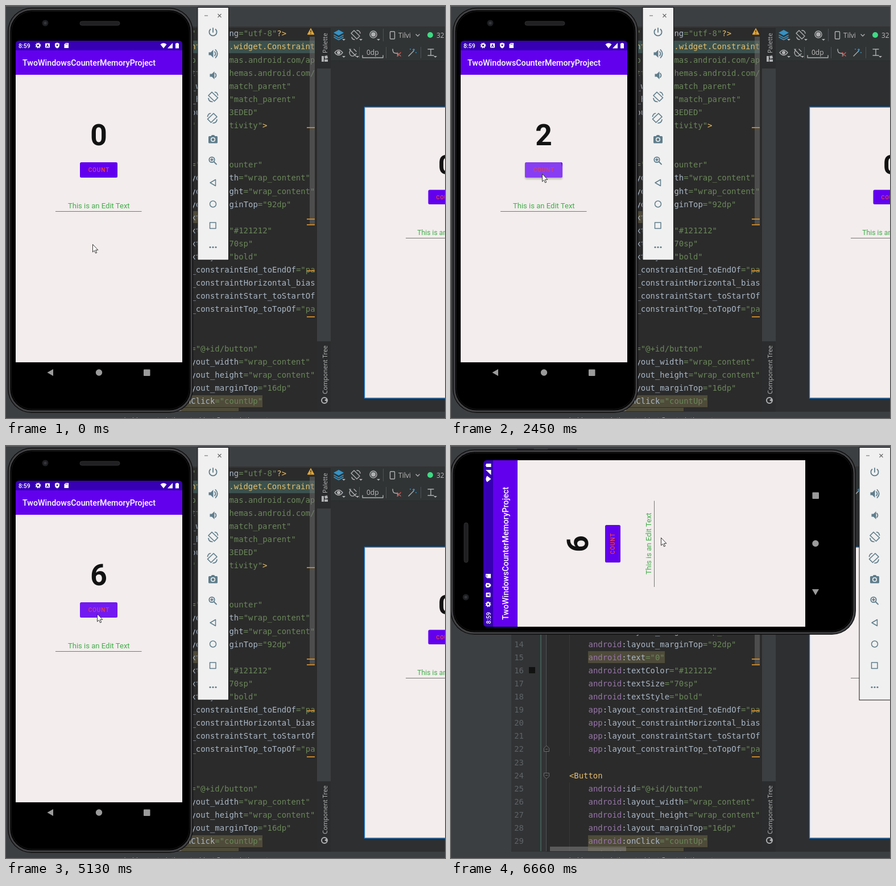
Recreate the animation shown at these times as an HTML page. Size 772 by 725 pixels, loop 8000 ms.

```html
<!DOCTYPE html>
<html lang="en">
<head>
<meta charset="utf-8">
<title>Counter app in an emulator</title>
<style>
html, body { margin: 0; width: 100%; height: 100%; overflow: hidden; background: #3c3f41; }
svg { display: block; width: 772px; height: 725px; }
text { white-space: pre; }
.code { font: 13.93px "DejaVu Sans Mono", "Noto Sans Mono", monospace; fill: #a9b7c6; }
.code .tag { fill: #e8bf6a; }
.code .ns { fill: #9876aa; }
.code .str { fill: #6a8759; }
.code .num { fill: #606366; text-anchor: end; }
.ui { font-family: "Open Sans", "Noto Sans", sans-serif; fill: #bbb; }
.app { font-family: Roboto, sans-serif; }
.mid { text-anchor: middle; }
.line { fill: none; stroke-linecap: round; stroke-linejoin: round; }
</style>
</head>
<body>
<svg viewBox="0 0 772 725" xmlns="http://www.w3.org/2000/svg">
  <defs>
    <clipPath id="editorClip"><rect x="106" y="38" width="437" height="675"/></clipPath>
    <clipPath id="surfaceClip"><rect x="631" y="179" width="141" height="511"/></clipPath>
    <clipPath id="buttonClip"><rect x="130" y="275" width="66" height="27" rx="2.5"/></clipPath>
    <clipPath id="wideClip"><rect x="1" y="2" width="712" height="334" rx="40"/></clipPath>
    <filter id="blur" x="-20%" y="-40%" width="140%" height="200%"><feGaussianBlur stdDeviation="1.6"/></filter>
  </defs>

  <!-- editor -->
  <rect width="772" height="725" fill="#3c3f41"/>
  <rect width="772" height="1" fill="#606164"/>
  <rect x="106" y="36" width="666" height="1.5" fill="#323232"/>
  <rect x="106" y="38" width="441" height="676" fill="#2b2b2b"/>
  <rect x="106" y="38" width="62" height="676" fill="#313335"/>
  <g clip-path="url(#editorClip)">
    <rect x="174" y="61" width="369" height="22" fill="#3b514d"/>
    <g fill="#4f4b3a">
      <rect x="241" y="361" width="135" height="21"/>
      <rect x="241" y="685" width="210" height="21"/>
      <rect x="241" y="707" width="168" height="21"/>
    </g>
    <path d="M208.5 268V545M208.5 592V714" stroke="#383838"/>
    <path d="M158 38V714" stroke="#47685c" stroke-width="1.5"/>
    <path d="M167.5 38V714" stroke="#505254"/>
    <g fill="#2b2b2b" stroke="#6a6d6f">
      <path d="M163.5 537.5v-6l4.5-4 4.5 4v6z"/>
      <path d="M163.5 575.5v6l4.5 4 4.5-4v-6z"/>
      <path d="M166 533.5h4M166 579.5h4"/>
    </g>
    <rect x="137" y="389" width="11" height="11" fill="#121212"/>
    <g id="code" class="code"></g>
    <rect x="174" y="705" width="134" height="8" fill="#8a8a8a" opacity=".5"/>
    <rect x="534" y="54" width="9" height="331" fill="#777" opacity=".45"/>
    <path d="M529 214H543M529 375H543M529 385H543M529 466H543M529 547H543" stroke="#c2842c" stroke-width="2"/>
    <path d="M536 39.5l5.8 10.5h-11.6z" fill="#e0a63a" stroke="#e0a63a" stroke-linejoin="round"/>
    <path d="M536 42.5v4M536 48v1.3" stroke="#3a3020" stroke-width="1.4"/>
  </g>
  <text class="ui" x="190" y="732" font-size="11.5">androidx.constraintlayout.widget.ConstraintLayout</text>

  <!-- design pane -->
  <rect x="543" y="38" width="4" height="676" fill="#2b2b2b"/>
  <rect x="547" y="38" width="24" height="72" fill="#2a2c2d"/>
  <rect x="547" y="590" width="24" height="124" fill="#2a2c2d"/>
  <g class="ui" font-size="11">
    <text transform="translate(565 83) rotate(-90)">Palette</text>
    <text transform="translate(565 683) rotate(-90)">Component Tree</text>
  </g>
  <path d="M555 88h4v10h-4zM560 94h6v4h-6zM560 88l5-1 1 5-5 1z" fill="#afb1b3"/>
  <circle cx="560" cy="694" r="5" fill="none" stroke="#afb1b3" stroke-width="2"/>
  <path d="M560 694l4-4v6z" fill="#afb1b3"/>
  <rect x="571" y="37" width="201" height="677" fill="#2d2f31"/>
  <rect x="571" y="37" width="201" height="59" fill="#313435"/>
  <path d="M571 96.5H772" stroke="#292b2c"/>
  <path d="M663.5 40V62M621.5 72V92M668.5 72V92M729.5 72V92" stroke="#505355"/>
  <path d="M585 42l9 5-9 5-9-5z" fill="#3592c4"/>
  <path class="line" d="M577 51.5l8 4.5 8-4.5M577 55l8 4.5 8-4.5" stroke="#3592c4" stroke-width="1.7"/>
  <g class="line" stroke="#afb1b3" stroke-width="1.4">
    <path d="M612 43l10 10-5 5-10-10zM608 55q1 4 5 4M623 48q-1-5-6-5"/>
    <circle cx="646" cy="50" r="6"/>
    <rect x="675.5" y="45" width="8" height="13" rx="1"/>
    <path d="M721 50l3 3 3-3"/>
    <path d="M578 82q7-9 14 0q-7 9-14 0z"/>
    <path d="M606 76l-2 6q1 7 7 6l5-4M604 76l11 12M612 76l4 4"/>
    <path d="M627 87v4h36v-4"/>
    <path d="M680 76q0 7 5 7t4 5"/>
    <path d="M708 88l9-9"/>
    <path d="M742 76h10M747 76v11M742 87h10"/>
  </g>
  <circle cx="646" cy="50" r="4" fill="#afb1b3"/>
  <circle cx="585" cy="82" r="3" fill="#afb1b3"/>
  <path class="line" d="M688 82l6 6m0-6l-6 6" stroke="#c75450" stroke-width="1.7"/>
  <path d="M717 75v4M715 77h4M711 75v2M720 82h2" stroke="#3592c4" stroke-width="1.5"/>
  <g fill="#afb1b3"><path id="drop" d="M591 58h6l-3 3z"/><use href="#drop" x="30"/><use href="#drop" x="61"/><use href="#drop" y="30"/><use href="#drop" x="24" y="30"/><use href="#drop" x="161" y="30"/></g>
  <circle cx="746" cy="51" r="5" fill="#3ddc84"/>
  <g class="ui" font-size="12">
    <text x="690" y="56">Tilvi</text>
    <text x="757" y="56">32</text>
    <text x="634" y="86">0dp</text>
  </g>
  <rect x="630.5" y="178" width="150" height="512" fill="#f3eded" stroke="#1c7cd5" stroke-width="1.4"/>
  <g class="app mid" clip-path="url(#surfaceClip)">
    <text x="774" y="295.5" font-size="49" font-weight="700" fill="#121212">0</text>
    <rect x="742.5" y="323.5" width="63" height="25.5" rx="2.5" fill="#6200ee"/>
    <text x="774" y="339.5" font-size="9.3" font-weight="500" letter-spacing=".85" fill="#f44336">COUNT</text>
    <text x="774" y="403" font-size="12.2" fill="#3fae49">This is an Edit Text</text>
    <path d="M703 408.5H845" stroke="#777"/>
  </g>

  <!-- phone -->
  <g id="clipBox"><g id="phone">
    <rect x="328" y="174" width="2.5" height="52" rx="1" fill="#29292b"/>
    <rect x="328" y="120" width="2.5" height="30" rx="1" fill="#29292b"/>
    <rect x="3" y="3" width="326" height="713" rx="42" fill="#0d0d0e"/>
    <rect x="6" y="6" width="320" height="707" rx="39" fill="#000" stroke="#424245" stroke-width="3"/>
    <rect x="9.5" y="9.5" width="313" height="700" rx="36" fill="#000" stroke="#19191a"/>
    <circle cx="69" cy="30" r="5.5" fill="#1e1f22"/>
    <circle cx="69" cy="30" r="2.5" fill="#34363c"/>
    <rect x="130" y="27" width="70" height="7" rx="3.5" fill="#202022" stroke="#303033"/>
    <rect x="17" y="120" width="293" height="507" fill="#f3eded"/>
    <path d="M17 79V67q0-6 6-6H304q6 0 6 6V79z" fill="#3700b3"/>
    <rect x="17" y="78" width="293" height="43" fill="#6200ee"/>
    <g class="app">
      <text x="22" y="73.5" font-size="10.5" font-weight="500" fill="#fff">8:59</text>
      <text x="29" y="105" font-size="14.26" font-weight="500" fill="#fff">TwoWindowsCounterMemoryProject</text>
    </g>
    <circle cx="56.5" cy="69.5" r="2.7" fill="none" stroke="#fff" stroke-width="2"/>
    <circle cx="56.5" cy="69.5" r="4.2" fill="none" stroke="#fff" stroke-width="1.5" stroke-dasharray="1.65"/>
    <g fill="#fff">
      <rect x="69" y="65.5" width="8" height="8" rx="1"/>
      <path d="M90 64.5l4 1.5v3q0 4-4 5.5q-4-1.5-4-5.5v-3z"/>
      <path d="M105 65h5v9h-7.5v-6.5z"/>
      <path d="M277 74.5l-5.5-7q5.5-4.5 11 0z"/>
      <path d="M293 65v9.5h-9z"/>
      <path d="M299.5 65h3v1h1.5v8.5h-6v-8.5h1.5z"/>
    </g>
    <path class="line" d="M71.2 72l1.8-4.7 1.8 4.7M72 70.6h2" stroke="#3700b3"/>
    <circle cx="90" cy="69" r="1.5" fill="#3700b3"/>
    <path d="M105.5 66v2M107.5 66v2" stroke="#3700b3" stroke-width=".8"/>
    <g class="app mid">
      <text id="count" x="163" y="244.6" font-size="51.5" font-weight="700" fill="#121212">0</text>
      <rect id="shade" x="130" y="277" width="66" height="28" rx="3" fill="#000" filter="url(#blur)"/>
      <rect x="130" y="275" width="66" height="27" rx="2.5" fill="#6200ee"/>
      <circle id="ripple" cx="158" cy="292" r="0" fill="#fff" clip-path="url(#buttonClip)"/>
      <text id="label" x="163.4" y="292.3" font-size="10" font-weight="500" letter-spacing=".9" fill="#f44336">COUNT</text>
      <text x="163.3" y="356.3" font-size="13.05" fill="#3fae49">This is an Edit Text</text>
    </g>
    <path d="M87 361.5H238.5" stroke="#777"/>
    <g fill="#9b9b9b">
      <path d="M72.5 645l10.5-6v12z"/>
      <circle cx="163.5" cy="645" r="5.7"/>
      <rect x="242" y="639.5" width="11.5" height="11.5" rx="1"/>
    </g>
  </g></g>

  <!-- emulator controls -->
  <g id="panel">
    <rect x="337" y="2.5" width="54.5" height="444.5" fill="#f0f0f0" stroke="#151515"/>
    <path d="M349 17h6M372.5 14l6 6m0-6l-6 6" stroke="#666" stroke-width="1.1"/>
    <g class="line" stroke="#5f7d8b" stroke-width="1.8">
      <path d="M364 39v7M359.5 41a6.6 6.6 0 1 0 9 0"/>
      <path d="M367 80.5q3 3.5 0 7M368.5 77q6.5 7 0 14"/>
      <path d="M368 118.5q3 3.5 0 7"/>
      <path id="turn" stroke-width="1.7" d="M362 151.5l10.5 10-6 6-10.5-10zM356 162.5q1 6 7 6M372.5 157q-1-5-5-5.5"/>
      <use href="#turn" transform="translate(727 37.5) scale(-1 1)"/>
      <circle cx="362" cy="270.5" r="4.7"/>
      <path d="M365.5 274l4.5 4.5M360 270.5h4M362 268.5v4"/>
      <path d="M359 311l9.5-5.5v11z" stroke-width="1.5"/>
      <circle cx="364" cy="348.5" r="5.5" stroke-width="1.5"/>
      <rect x="358.5" y="381" width="10.5" height="10.5" stroke-width="1.5"/>
    </g>
    <g fill="#5f7d8b">
      <path id="horn" d="M356.5 81.5h3.5l4.5-4.5v14l-4.5-4.5h-3.5z"/>
      <use href="#horn" x="2" y="38"/>
      <path d="M357.5 229h3l1.5-2h4l1.5 2h3q1.5 0 1.5 1.5v9.5q0 1.5-1.5 1.5h-13q-1.5 0-1.5-1.5v-9.5q0-1.5 1.5-1.5z"/>
      <circle cx="359" cy="424.5" r="1.6"/><circle cx="364" cy="424.5" r="1.6"/><circle cx="369" cy="424.5" r="1.6"/>
    </g>
    <circle cx="364" cy="235" r="3.3" fill="none" stroke="#f0f0f0" stroke-width="1.6"/>
  </g>

  <path id="cursor" d="M.5.5V14L3.5 11.2 5.6 16 7.7 15.1 5.6 10.4H9.8Z" fill="#fff" stroke="#222" stroke-width=".9"/>
</svg>
<script>
const $ = id => document.getElementById(id);
const LOOP = 8000;

const attr = (name, value) => `        ${name}="${value}"`;
const LINES = [
  '<?xml version="1.0" encoding="utf-8"?>',
  '<androidx.constraintlayout.widget.ConstraintLayout',
  '    xmlns:app="http://schemas.android.com/apk/res-auto"',
  '    xmlns:tools="http://schemas.android.com/tools"',
  '    android:layout_width="match_parent"',
  '    android:layout_height="match_parent"',
  '    android:background="#F3EDED"',
  '    tools:context=".MainActivity">',
  '',
  '    <TextView',
  attr('android:id', '@+id/counter'),
  attr('android:layout_width', 'wrap_content'),
  attr('android:layout_height', 'wrap_content'),
  attr('android:layout_marginTop', '92dp'),
  attr('android:text', '0'),
  attr('android:textColor', '#121212'),
  attr('android:textSize', '70sp'),
  attr('android:textStyle', 'bold'),
  attr('app:layout_constraintEnd_toEndOf', 'parent'),
  attr('app:layout_constraintHorizontal_bias', '0.498'),
  attr('app:layout_constraintStart_toStartOf', 'parent'),
  attr('app:layout_constraintTop_toTopOf', 'parent') + ' />',
  '',
  '    <Button',
  attr('android:id', '@+id/button'),
  attr('android:layout_width', 'wrap_content'),
  attr('android:layout_height', 'wrap_content'),
  attr('android:layout_marginTop', '16dp'),
  attr('android:onClick', 'countUp'),
  attr('android:text', 'Count')
];

const SVG = 'http://www.w3.org/2000/svg';
function add(parent, tag, cls, text, attrs = {}) {
  const el = document.createElementNS(SVG, tag);
  if (cls) el.setAttribute('class', cls);
  for (const key in attrs) el.setAttribute(key, attrs[key]);
  el.textContent = text;
  return parent.appendChild(el);
}

const TOKEN = /(<\??[\w.]+|\??\/?>)|(\w+)(?=:)|(="[^"]*")|[^<>"=?\/]/g;
LINES.forEach((line, i) => {
  const y = 53.3 + i * 23.1;
  add($('code'), 'text', 'num', i + 1, { x: 128, y });
  const body = line.trimStart();
  const x = 174.4 + (line.length - body.length) * 8.388;
  const row = add($('code'), 'text', '', '', { x, y });
  for (const [all, tag, ns, str] of body.matchAll(TOKEN)) {
    add(row, 'tspan', tag ? 'tag' : ns ? 'ns' : str ? 'str' : '', all);
  }
});

// Each row: start time, then values held until the next row.
const CURSOR = [
  [0, 152, 419], [150, 145, 351], [340, 154, 318], [480, 158, 308], [630, 159, 300],
  [750, 160, 295], [5280, 225, 223], [5430, 290, 178], [5550, 365, 148],
  [5670, 364, 154], [5820, 369, 161]
];
const COUNT = [[0, 0], [1750, 1], [2450, 2], [3160, 3], [3670, 4], [4400, 5], [4980, 6]];
// radius, opacity, shadow
const PRESS = [39, .24, .2];
const EARLY = [36, .24, .35];
const FADE = [60, .1, 0];
const REST = [0, 0, 0];
const RIPPLE = [
  [0, ...REST], [1750, ...PRESS], [1900, ...FADE], [2050, ...REST],
  [2450, ...PRESS], [2720, ...REST], [3010, ...EARLY], [3160, ...FADE],
  [3280, ...REST], [3670, ...EARLY], [3820, ...FADE], [3970, ...REST],
  [4400, ...PRESS], [4550, ...FADE], [4680, ...REST],
  [4980, ...PRESS], [5130, ...FADE], [5280, ...REST]
];
const PANEL = [[0, 0], [6250, 382], [6660, 381]];
const PHONE = [[0, 'tall'], [6380, 'cut'], [6530, 'wide']];

const at = (table, t) => table.findLast(row => row[0] <= t).slice(1);

function draw(t) {
  const [x, y] = at(CURSOR, t);
  $('cursor').setAttribute('transform', `translate(${x} ${y})`);
  $('count').textContent = at(COUNT, t)[0];

  const [r, glow, shade] = at(RIPPLE, t);
  $('ripple').setAttribute('r', r);
  $('ripple').setAttribute('opacity', glow);
  $('label').setAttribute('opacity', 1 - glow * 1.4);
  $('shade').setAttribute('opacity', shade);

  $('panel').setAttribute('transform', `translate(${at(PANEL, t)[0]} 0)`);
  const [pose] = at(PHONE, t);
  $('phone').setAttribute('transform', pose === 'wide' ? 'translate(-4 335) rotate(-90)' : '');
  $('clipBox').setAttribute('clip-path', pose === 'cut' ? 'url(#wideClip)' : 'none');
}

const start = performance.now();
function tick() {
  draw((performance.now() - start) % LOOP);
  requestAnimationFrame(tick);
}
tick();
</script>
</body>
</html>
```
